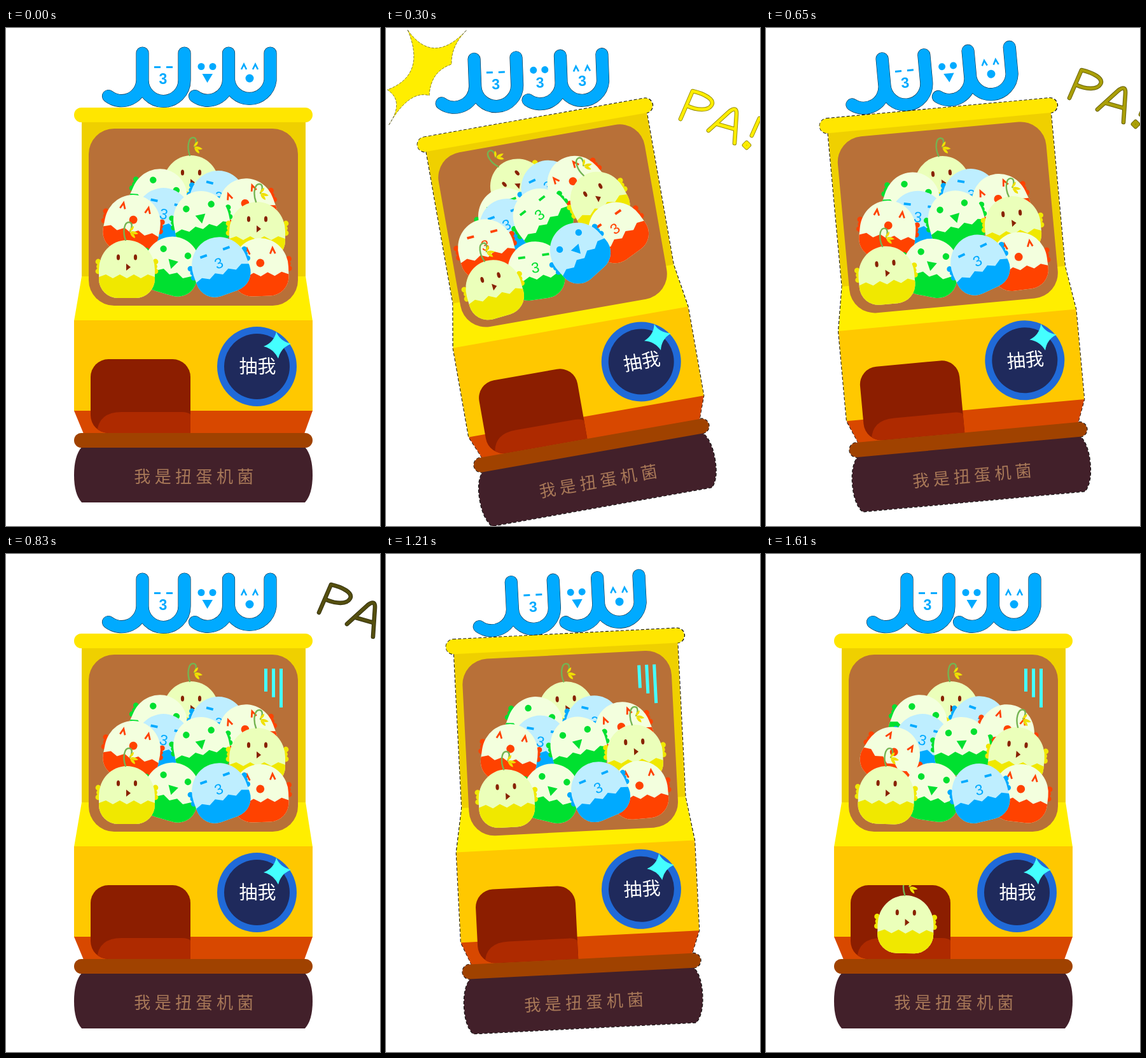
Animation of 588x782 px, one loop 1810 ms. Source, as an HTML page:

```html
<!DOCTYPE html>
<html lang="zh">
<head>
<meta charset="utf-8">
<title>扭蛋机</title>
<style>
html, body { margin: 0; width: 100%; height: 100%; overflow: hidden; background: #fff; }
svg { display: block; width: 100vw; height: 100vh; }
text { text-anchor: middle; font-family: "Noto Sans CJK SC", "Noto Sans CJK", sans-serif; }
.three { font-family: "Liberation Sans", sans-serif; }
.line { fill: none; stroke-linecap: round; stroke-linejoin: round; }
</style>
</head>
<body>
<svg viewBox="0 0 588 782" xmlns="http://www.w3.org/2000/svg">
  <defs>
    <path id="chute" d="M133 548A28 28 0 0 1 161 520H262A28 28 0 0 1 290 548V636H161A28 28 0 0 1 133 608Z"/>
    <clipPath id="chuteClip"><use href="#chute"/></clipPath>
    <path id="letters" class="line" d="M161 107A33 33 0 0 0 214.5 82V39.5M214.5 82A33 33 0 0 0 280.5 82V39.5M297 107A33 33 0 0 0 350 82V39.5M350 82A33 33 0 0 0 415.5 82V39.5"/>
    <g id="pa" class="line">
      <path d="M463 143L482 99C500 103 517 112 512 121C507 130 490 130 473 122M507 161L540 131Q552 122 551 136L548 181M521 151L549 159M587 142L575 169"/>
      <path d="M567 180L571 184L567 188L563 184Z"/>
    </g>
  </defs>

  <path id="burst" fill="#ffee00" stroke="#333300" stroke-width=".6" stroke-dasharray="4 2" d="M34 3Q74 60 127 3Q102 28 103 57Q70 68 68 106Q36 97 4 153Q30 115 2 97Q64 74 34 3Z"/>

  <g id="sign" fill="#00aaff">
    <use href="#letters" stroke="#0a2c44" stroke-width="20.200"/>
    <use href="#letters" stroke="#00aaff" stroke-width="19"/>
    <path d="M233 60H243V63H233ZM252 60H262V63H252Z"/>
    <circle cx="307" cy="60.500" r="5.500"/><circle cx="325" cy="60.500" r="5.500"/>
    <path fill="none" stroke="#00aaff" stroke-width="2.600" d="M370 65L374 57L378 65M388 65L392 57L396 65"/>
    <g id="signMouths"></g>
  </g>

  <g id="machine">
    <path id="edge" fill="none" stroke="#111" stroke-width="2" stroke-dasharray="5 3" d="M118.500 125H470.500A11.500 11.500 0 0 1 471 148V390L482 459V601L469 636H470.500A11.500 11.500 0 0 1 470.500 659Q482 672 482 702Q482 732 470 745H119Q107 732 107 702Q107 672 119 659A11.500 11.500 0 0 1 118.500 636H122L107 601V459L119 390V148A11.500 11.500 0 0 1 118.500 125Z"/>
    <path fill="#efd000" d="M119 140H471V392H119Z"/>
    <rect x="107" y="125" width="375" height="23" rx="11.500" fill="#ffe600"/>
    <path fill="#ffee00" d="M119 390H471L482 460H107Z"/>
    <rect x="130" y="158" width="329" height="278" rx="40" fill="#b87038"/>
    <path fill="#ffc800" d="M107 459H482V602H107Z"/>
    <path fill="#d84800" d="M107 601H482L469 637H122Z"/>
    <path fill="#42202a" d="M119 658Q107 672 107 702Q107 732 119 745H470Q482 732 482 702Q482 672 470 658Z"/>
    <use href="#chute" fill="#8c1e00"/>
    <path clip-path="url(#chuteClip)" fill="#ae2a00" d="M143 636Q145 603 182 603H276Q286 603 290 607V636Z"/>
    <g id="prize" clip-path="url(#chuteClip)"></g>
    <rect x="107" y="636" width="375" height="23" rx="11.500" fill="#a04200"/>
    <text x="298.500" y="714" font-size="26" letter-spacing="6.400" font-weight="500" fill="#a87858">我是扭蛋机菌</text>
    <g id="balls"></g>
    <path id="shine" stroke="#44ffff" stroke-width="5" d="M408.500 180V216M420.500 180V225M432.500 180V241"/>
    <circle cx="394.500" cy="531.500" r="62.500" fill="#206ad8"/>
    <circle cx="394.500" cy="531.500" r="51.500" fill="#1f2a5c"/>
    <text x="395.500" y="541.500" font-size="29" fill="#fff">抽我</text>
    <path fill="#44ffff" d="M425 477Q430 491 448 496Q432 502 428 519Q421 504 405 500Q421 494 425 477Z"/>
  </g>

  <g id="shout"><use id="shoutEdge" href="#pa" stroke-width="6.600"/><use id="shoutFill" href="#pa" stroke-width="4.600"/></g>
</svg>
<script>
const $ = id => document.getElementById(id);
const LOOP = 1810, CX = 294.5, CY = 392;

const paint = {
  yellow: ["#ebffba", "#f0e800"],
  green: ["#f3ffde", "#00e030"],
  blue: ["#beeeff", "#00aaff"],
  red: ["#f3ffde", "#ff4200"]
};

// colour, face, rest pose as x, y, turn; back to front
const balls = [
  ["yellow", "bird", 291, 245, 0],
  ["green", "dots", 241, 266, 24],
  ["blue", "dash", 333, 269, 15],
  ["red", "caret", 378, 281, -20],
  ["blue", "dash", 247, 296, 12],
  ["red", "caret", 199, 307, 11],
  ["green", "dots", 307, 301, -11],
  ["yellow", "bird", 395, 318, 0],
  ["red", "caret", 400, 375, -2],
  ["green", "dots", 261, 372.5, 16],
  ["blue", "dash", 336, 373, -20],
  ["yellow", "bird", 190, 378, 0]
];
const jolted = [
  [252, 228, -32], [225, 270, -10], [299, 239, -15], [341, 239, -30],
  [224, 287, -10], [185, 313, -5], [279, 280, -28], [372, 270, -18],
  [392, 322, -26], [256, 361, 2], [327, 343, -32], [186, 378, -6]
];
const joltFace = { 1: "dash", 5: "dash", 6: "dash", 8: "dash", 9: "dash", 10: "dots" };
const settled = [
  [291, 245, 0], [241, 266, 20], [335, 268, 20], [378, 281, 18],
  [245, 296, 14], [198, 316, 32], [308, 301, -3], [394, 317, 5],
  [400, 375, 7], [261, 373, 8], [336, 374, -14], [189, 378, 2]
];

const place = (x, y, turn) => `translate(${x} ${y}) rotate(${turn})`;
const three = (x, y, size, weight = 400) =>
  `<text class="three" x="${x}" y="${y}" font-size="${size}" font-weight="${weight}">3</text>`;
const both = draw => draw(-1) + draw(1);

const faces = {
  bird: () => `<g fill="#882200">${both(s => `<ellipse cx="${s * 13.5}" cy="-18" rx="2.6" ry="4.6"/>`)}
    <path d="M-1 -8L6 -2.500L-1 3Z"/></g>`,
  dots: () => both(s => `<circle cx="${s * 20}" cy="-21" r="5.2"/>`) + `<path d="M-8 -8H8L0 6Z"/>`,
  dash: () => both(s => `<rect x="${s * 19 - 5.5}" y="-24" width="11" height="3.8"/>`) + three(0, 4, 23),
  caret: c => both(s => `<path fill="none" stroke="${c}" stroke-width="2.8" d="M${s * 20 - 4} -20L${s * 20} -29L${s * 20 + 4} -20"/>`) +
    `<circle cy="-6" r="6.4"/>`
};

const sprout = `<path class="line" stroke="#74b452" stroke-width="2.4" d="M-2 -45C-7 -58 -4 -73 3 -73C10 -73 8 -63 5 -59"/>
  <path fill="#f0e000" d="M4 -59Q11 -60 11 -67Q6 -66 4 -59ZM5 -58Q11 -61 18 -55Q11 -52 5 -58ZM5 -57Q7 -49 13 -48Q13 -55 5 -57Z"/>`;

function ballMarkup(colour) {
  const [light, shell] = paint[colour];
  let zigzag = "M-44 13";
  for (let k = 1; k < 8; k++) zigzag += `L${-44 + k * 11} ${k % 2 ? 9 : 15}`;
  const wings = both(s => [-11, -3.5, 4].map((y, k) =>
    `<circle cx="${s * (k === 1 ? 43.5 : 45)}" cy="${y}" r="4.4"/>`).join(""));
  return `<g fill="${shell}">${wings}
    <path fill="${light}" d="M-44 1A44 46 0 0 1 44 1V16A30 30 0 0 1 14 46H-14A30 30 0 0 1 -44 16Z"/>
    <path d="${zigzag}L44 13V16A30 30 0 0 1 14 46H-14A30 30 0 0 1 -44 16Z"/>
    <g class="face"></g></g>${colour === "yellow" ? sprout : ""}`;
}

$("balls").innerHTML = balls.map(b => `<g>${ballMarkup(b[0])}</g>`).join("");
$("prize").innerHTML = `<g transform="${place(219.5, 581, 1)}">${ballMarkup("yellow")}</g>`;
$("prize").querySelector(".face").innerHTML = faces.bird();
const nodes = [...$("balls").children];

let shownPose = "";
function setPose(name) {
  if (name === shownPose) return;
  shownPose = name;
  const jolt = name === "jolt";
  balls.forEach(([colour, face, ...rest], k) => {
    const at = jolt ? jolted[k] : name === "settled" ? settled[k] : rest;
    nodes[k].setAttribute("transform", place(...at));
    const kind = jolt && joltFace[k] || face;
    nodes[k].querySelector(".face").innerHTML = faces[kind](paint[colour][1]);
  });
  $("signMouths").innerHTML = three(247, 88, 23, 700) + (jolt
    ? three(316.5, 88, 23, 700) + three(383, 88, 23, 700)
    : `<path d="M308.500 72H325L316.500 86Z"/><circle cx="383" cy="79" r="6.5"/>`);
}

const show = (id, on) => $(id).setAttribute("display", on ? "inline" : "none");
const move = (id, value) => $(id).setAttribute("transform", value);

// tilt in degrees; the long swing back runs in 30 ms steps
function tilt(t, step) {
  if (t < 170) return 0;
  if (t < 300) return -5;
  if (t < 500) return -10;
  if (t < 1080) return (step - 11) * (step < 11 ? 0.875 : 0.69);
  return t >= 1210 && t < 1340 ? -2.9 : 0;
}

function render(t) {
  const jolt = t >= 300 && t < 500;
  const step = Math.min(17, Math.floor((t - 500) / 30));
  const lean = jolt ? 1 : t >= 170 && t < 300 ? 0.5 : 0;
  const angle = tilt(t, step);
  const swing = `translate(${-16 * lean} ${12 * lean}) rotate(${angle} ${CX} ${CY})`;

  setPose(jolt ? "jolt" : t >= 1610 ? "settled" : "rest");
  move("machine", swing);
  move("sign", jolt ? "translate(-74.7 6.5) rotate(-2.2 288 73.5)"
    : t >= 1460 ? "translate(7 0)" : swing);
  show("edge", angle !== 0);
  show("burst", jolt);
  show("prize", t >= 1610);
  show("shine", t >= 830);

  const shouting = t >= 300 && step < 17;
  show("shout", shouting);
  if (!shouting) return;
  const glow = jolt ? 1 : 1 - (step + 1) / 18;
  const tone = k => `rgb(${255 * glow * k},${238 * glow * k},${22 * (1 - glow)})`;
  $("shoutEdge").setAttribute("stroke", tone(0.6));
  $("shoutFill").setAttribute("stroke", tone(1));
  $("shout").setAttribute("fill", tone(1));
  move("shout", jolt ? "" : `translate(${14 + 2.5 * (step - 5)} ${-33 - 3 * (step - 5)})`);
}

const start = performance.now();
function tick() {
  render((performance.now() - start) % LOOP);
  requestAnimationFrame(tick);
}
tick();
</script>
</body>
</html>
```
